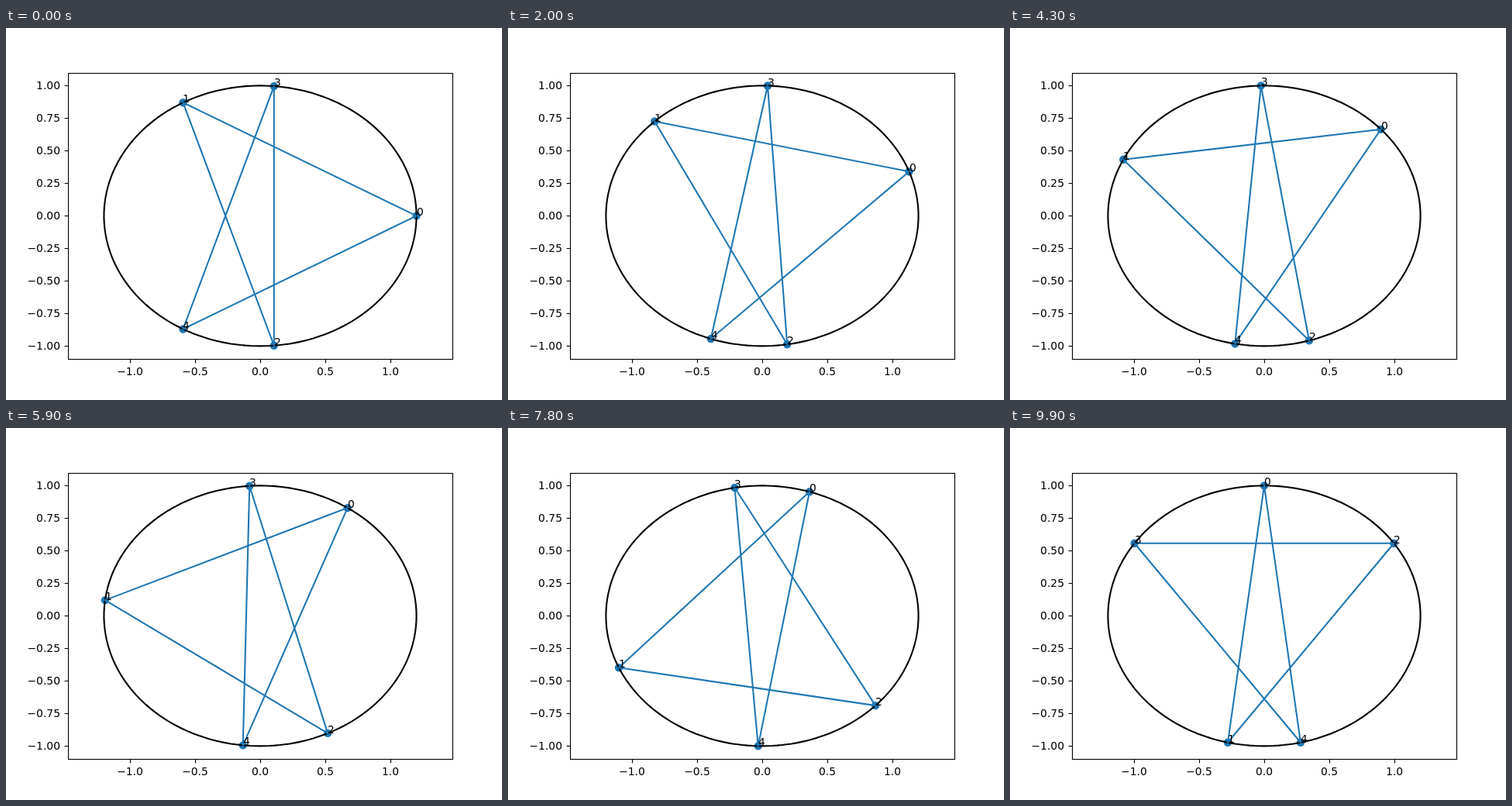
An HTML page for the animation above (10 s loop, 640x480 px).

```html
<!DOCTYPE html>
<html lang="en">
<head>
<meta charset="utf-8">
<title>Equilateral star in an ellipse</title>
<style>
  html, body { margin: 0; width: 100%; height: 100%; overflow: hidden; background: #fff; }
  svg { display: block; width: 640px; height: 480px; }
  text { font: 13.889px "DejaVu Sans", sans-serif; fill: #000; }
  .axis { fill: none; stroke: #000; stroke-width: 1.11; }
  .ring { fill: none; stroke: #000; stroke-width: 2.083; stroke-linecap: square; }
  .star { fill: none; stroke: #1f77b4; stroke-width: 2.083; stroke-linejoin: round; }
  .dot { fill: #1f77b4; }
</style>
</head>
<body>
<svg id="stage" viewBox="0 0 640 480"></svg>
<script>
const A = 1.2, B = 1, SIDES = 5, TURNS = 2;
const STEPS = 100, STEP_MS = 100;
const SCALE = 168, CX = 328, CY = 242.4;
const stage = document.getElementById('stage');

const px = x => CX + SCALE * x;
const py = y => CY - SCALE * y;
const at = t => [px(A * Math.cos(t)), py(B * Math.sin(t))];
const snap = v => Math.floor(v + 0.5) + 0.5;

function add(tag, attrs, text) {
  const el = document.createElementNS('http://www.w3.org/2000/svg', tag);
  for (const k in attrs) el.setAttribute(k, attrs[k]);
  if (text !== undefined) el.textContent = text;
  return stage.appendChild(el);
}

function bisect(lo, hi, goOn) {
  for (let i = 0; i < 34; i++) {
    const mid = (lo + hi) / 2;
    if (goOn(mid)) lo = mid; else hi = mid;
  }
  return (lo + hi) / 2;
}

// Ellipse angle one chord of the given length ahead of t.
function nextAngle(t, len) {
  const x = A * Math.cos(t), y = B * Math.sin(t);
  return bisect(t, t + 1.5 * Math.PI, u => {
    const c = Math.cos(u), s = Math.sin(u);
    const dx = A * c - x, dy = B * s - y;
    return dx * dx + dy * dy < len * len && dy * B * c - dx * A * s > 0;
  });
}

function chain(t, len) {
  const angles = [t];
  for (let i = 0; i < SIDES; i++) angles.push(nextAngle(angles[i], len));
  return angles;
}

// Five equal chords that close up after two turns.
function starFrom(t) {
  const len = bisect(1.5, 2.2, l => chain(t, l)[SIDES] - t < TURNS * 2 * Math.PI);
  return chain(t, len).slice(0, SIDES);
}

// Angles evenly spaced by arc length over a quarter of the ellipse.
function quarterAngles(count) {
  const n = 4000, h = Math.PI / 2 / n, arc = [0];
  for (let i = 0; i < n; i++) {
    const t = (i + 0.5) * h;
    arc.push(arc[i] + h * Math.hypot(A * Math.sin(t), B * Math.cos(t)));
  }
  const angles = [];
  for (let k = 0, i = 0; k < count; k++) {
    const goal = arc[n] * k / (count - 1);
    while (i < n - 1 && arc[i + 1] < goal) i++;
    angles.push(h * (i + (goal - arc[i]) / (arc[i + 1] - arc[i])));
  }
  return angles;
}

const dots = Array.from({ length: SIDES }, () => add('circle', { class: 'dot', r: 5.2 }));

const ring = Array.from({ length: 201 }, (_, i) => at(i / 100 * Math.PI));
add('polyline', { class: 'ring', points: ring.join(' ') });
const star = add('polygon', { class: 'star' });

const label = v => v.replace('-', '\u2212');
for (let i = -2; i <= 2; i++) {
  const x = px(i / 2);
  add('path', { class: 'axis', d: `M${snap(x)} 427.5V432.4` });
  add('text', { x, y: 448, 'text-anchor': 'middle' }, label((i / 2).toFixed(1)));
}
for (let i = -4; i <= 4; i++) {
  const y = py(i / 4);
  add('path', { class: 'axis', d: `M80.5 ${snap(y)}H75.6` });
  add('text', { x: 70, y: Math.round(y + 4.8), 'text-anchor': 'end' }, label((i / 4).toFixed(2)));
}
add('rect', { class: 'axis', x: 80.5, y: 58.5, width: 496, height: 369 });

const names = dots.map((_, i) => add('text', {}, i));
const poses = quarterAngles(STEPS).map(starFrom);

let shown = -1;
function draw(step) {
  if (step === shown) return;
  shown = step;
  const pts = poses[step].map(at);
  star.setAttribute('points', pts.join(' '));
  pts.forEach(([x, y], i) => {
    dots[i].setAttribute('cx', x);
    dots[i].setAttribute('cy', y);
    names[i].setAttribute('x', Math.round(x));
    names[i].setAttribute('y', Math.round(y));
  });
}

const start = performance.now();
function tick() {
  draw(Math.floor((performance.now() - start) / STEP_MS) % STEPS);
  requestAnimationFrame(tick);
}
tick();
</script>
</body>
</html>
```
